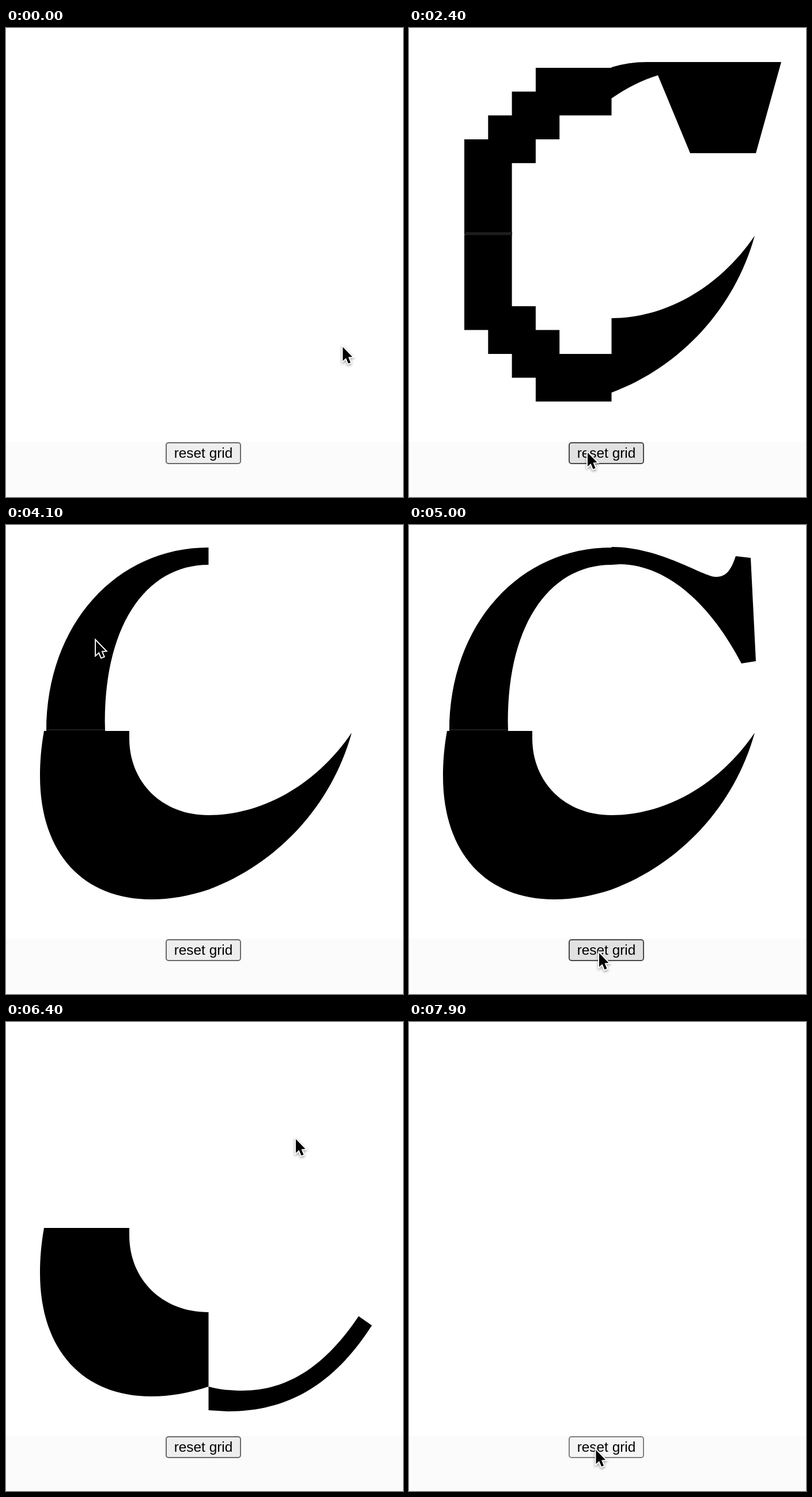
An HTML page with a canvas for the animation above (8000 ms loop, 689 by 813 pixels).

```html
<!DOCTYPE html>
<html lang="en">
<head>
<meta charset="utf-8">
<title>Letter grid</title>
<style>
  html, body { margin: 0; width: 100%; height: 100%; overflow: hidden; background: #fff; }
  #foot { position: absolute; left: 0; top: 717px; width: 689px; height: 96px; background: #fbfbfb; }
  #reset {
    position: absolute; left: 277px; top: 718px; width: 131px; height: 38px;
    box-sizing: border-box; border: 2px solid; border-radius: 5px;
    font: 24.4px/34px Arial, "Liberation Sans", sans-serif;
    text-align: center; white-space: nowrap; color: #000;
  }
  canvas { position: absolute; left: 0; top: 0; }
</style>
</head>
<body>
<div id="foot"></div>
<div id="reset">reset grid</div>
<canvas id="stage" width="689" height="813"></canvas>
<script>
const LOOP = 8000, STEP = 100;
const MID = 351.5, CELL = 41.3;
const ctx = document.getElementById('stage').getContext('2d');
const button = document.getElementById('reset');

// Stepped quarter ring: rows run from the outer edge towards the middle
function stairs(edge, dir) {
  const path = new Path2D();
  const column = n => 96 + n * CELL;
  for (let row = 0; row < 7; row++) {
    const left = column(Math.max(0, 3 - row));
    const right = row < 2 ? MID : column(Math.max(2, 6 - row));
    const y = edge + dir * row * CELL;
    path.rect(left, Math.min(y, y + dir * CELL), right - left, CELL);
  }
  return path;
}

// Letter quarters: t/b = top/bottom, l/r = left/right
const parts = {
  tlPixel: stairs(69, 1),
  blPixel: stairs(647.5, -1),
  trFlag: new Path2D('M351.5 68Q381 59 412 59H646L602 217H488L432 82Q392 94 351.5 122Z'),
  brTail: new Path2D('M351.5 503C440 503 535 455 600 360C565 487 470 588 351.5 632Z'),
  tlThin: new Path2D('M70 357C70 172 192 39 351.5 39V69C240 69 167 180 172 357Z'),
  blFat: new Path2D('M66 357C61 385 59 410 59 435C59 570 135 649 252 649' +
    'C285 649 318 643 351.5 632V503C270 503 214 445 214 370V357Z'),
  trSerif: new Path2D('M351.5 38C437 38 510 90 533 90C552 90 560 75 567 54L593 57L602 236L577 240' +
    'C525 140 450 69 366 68L351.5 69Z'),
  brHook: new Path2D('M351.5 632C370 637 389 639 410 639C490 639 555 595 612 510L635 526' +
    'C568 630 488 675 385 675L351.5 673Z'),
  tlLean: new Path2D('M351.5 67C203 107 84 226 66 357H214C217 275 275 175 351.5 121Z')
};

// Visits of the pointer: time, place, and what is clicked there
const visits = [
  [100, 584.5, 553, 'brTail'], [450, 547, 501], [800, 487, 223, 'trFlag'],
  [1300, 196, 228, 'tlPixel'], [1800, 205, 573, 'blPixel'], [2500, 310, 736, 'reset'],
  [3200, 392, 531, 'brTail'], [3700, 267, 531, 'blFat'], [4100, 156, 201, 'tlThin'],
  [4500, 480, 212, 'trSerif'], [5200, 330, 742, 'reset'],
  [5800, 164, 518, 'blFat'], [6300, 500, 492, 'brHook'], [6600, 503, 203, 'trSerif'],
  [7100, 281.5, 247, 'tlLean'], [7600, 322, 788], [7900, 324.5, 742, 'reset']
];

const arrow = new Path2D('M0 0V24L5.5 19L9.5 28.5L13.5 27L9.5 17.5L16.5 17Z');
const ease = u => u * u * (3 - 2 * u);
const clamp = u => Math.min(1, Math.max(0, u));

// The pointer sets off up to 500 ms before a visit and rests for its last 200 ms
function pointerAt(t) {
  const i = visits.findIndex(v => t < v[0]);
  if (i === 0) return visits[0].slice(1, 3);
  if (i < 0) return visits[visits.length - 1].slice(1, 3);
  const [past, x, y] = visits[i - 1], [next, nx, ny] = visits[i];
  const leave = Math.max(past, next - 500);
  const u = ease(clamp((t - leave) / (next - 200 - leave)));
  return [x + (nx - x) * u, y + (ny - y) * u];
}

function shownAt(t) {
  const done = visits.filter(v => v[0] <= t && v[3]).map(v => v[3]);
  return done.slice(done.lastIndexOf('reset') + 1);
}

function drawLetter(t) {
  const shown = shownAt(t), letter = new Path2D();
  for (const name of shown) letter.addPath(parts[name]);
  ctx.filter = 'blur(0.7px)';
  ctx.fillStyle = '#000';
  ctx.fill(letter);
  ctx.filter = 'none';
  ctx.fillStyle = '#1d1d1d';
  if (shown.includes('blPixel')) ctx.fillRect(97, 354, 82, 5);
  if (shown.includes('tlThin')) ctx.fillRect(71, 354, 101, 2);
}

function drawPointer(x, y) {
  ctx.save();
  ctx.translate(x, y);
  ctx.lineWidth = 3.8;
  ctx.strokeStyle = '#fff';
  ctx.shadowColor = 'rgba(0,0,0,.4)';
  ctx.shadowBlur = 4;
  ctx.shadowOffsetY = 2;
  ctx.stroke(arrow);
  ctx.shadowColor = 'transparent';
  ctx.fillStyle = '#000';
  ctx.fill(arrow);
  ctx.restore();
}

function styleButton(t, x, y) {
  const over = x >= 277 && x < 408 && y >= 718 && y < 756;
  const down = visits.some(v => v[3] === 'reset' && t >= v[0] && t < v[0] + STEP);
  button.style.background = down ? '#f5f5f5' : over ? '#e1e1e1' : '#eee';
  button.style.borderColor = down ? '#808080' : over ? '#484848' : '#6a6a6a';
}

function frame(now) {
  const t = Math.floor(((now + 4) % LOOP) / STEP) * STEP;
  const [x, y] = pointerAt(t);
  ctx.clearRect(0, 0, 689, 813);
  styleButton(t, x, y);
  drawLetter(t);
  drawPointer(x, y);
}

const start = performance.now();
function tick() {
  frame(performance.now() - start);
  requestAnimationFrame(tick);
}
tick();
</script>
</body>
</html>
```
